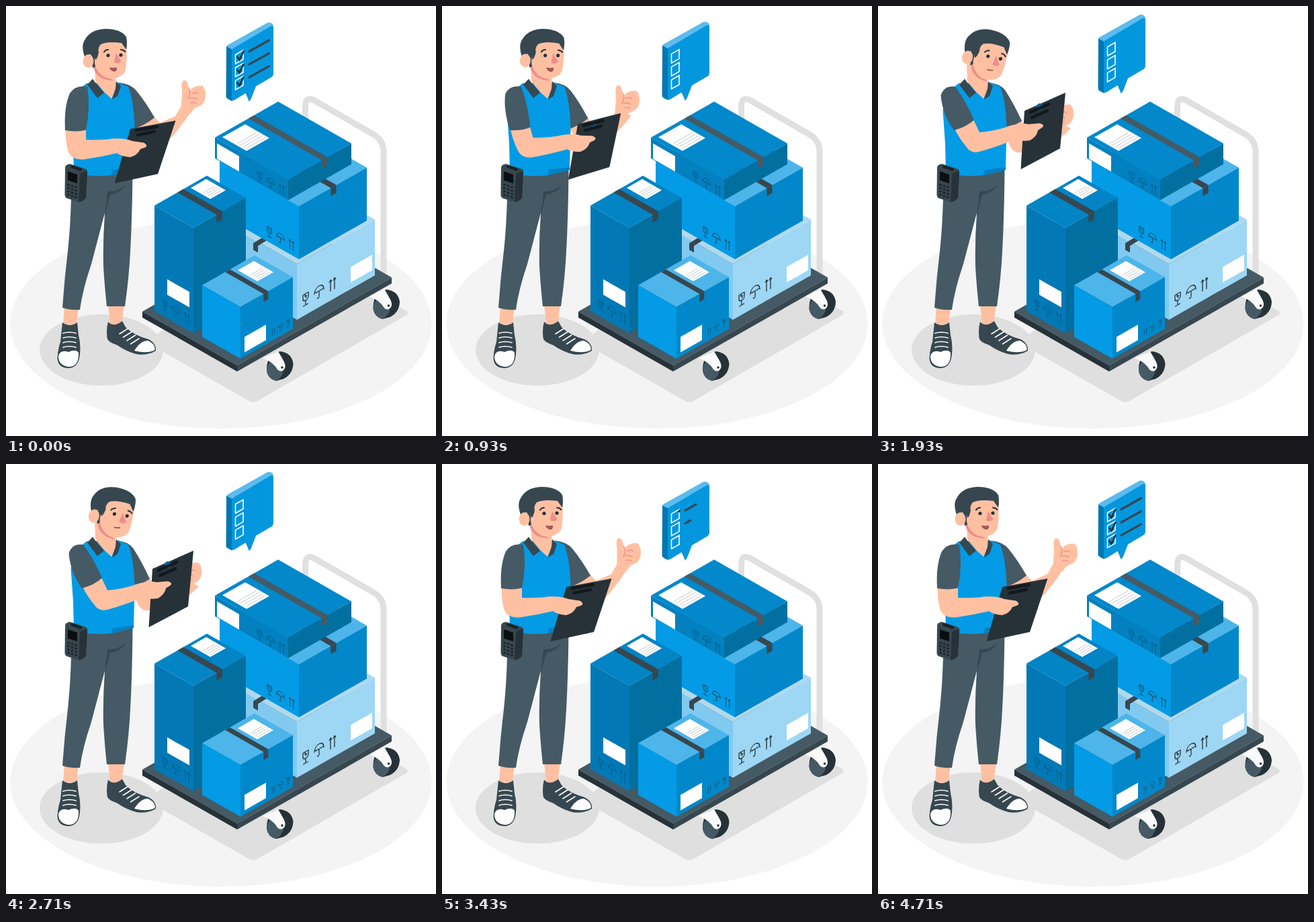
These frames come from a looping animation (640x640 px, 4780 ms). An HTML page:

```html
<!DOCTYPE html>
<html lang="en">
<head>
<meta charset="utf-8">
<title>Delivery check</title>
<style>
  html, body { margin: 0; width: 100%; height: 100%; overflow: hidden; background: #fff; }
  svg { display: block; width: 100vw; height: 100vh; }
</style>
</head>
<body>
<svg viewBox="0 0 640 640" xmlns="http://www.w3.org/2000/svg">
  <ellipse cx="320" cy="473" rx="313.5" ry="156" fill="#f4f4f4"/>
  <g fill="#dfdfdf">
    <ellipse cx="142" cy="512" rx="92" ry="53"/>
    <path d="M208 500L245 474L545 424L596 454Q600 457 596 460L374 588Q368 591 362 588Z"/>
  </g>
  <path d="M445.500 200V150Q445.500 133 459 140.500L545 190Q562 199 562 217V398" fill="none" stroke="#e0e0e0" stroke-width="9"/>

  <defs>
    <g id="wheel">
      <path d="M388 543Q387 527 398 517L408 514Q425 516 427.500 532Q427 548 413 555L402 558Q390 555 388 543Z" fill="#263238"/>
      <path d="M388 543Q388 530 399 527Q411 528 413 542Q412 552 402 558Q390 555 388 543Z" fill="#455a64"/>
      <path d="M382 524L405 514L412 526Q418 536 414 541Q409 546 404 541Q398 530 382 524Z" fill="#fafafa"/>
      <circle cx="411" cy="538" r="1.800" fill="#263238"/>
    </g>
  </defs>
  <use href="#wheel" x="158.500" y="-92"/>
  <use href="#wheel"/>
  <g id="cargo"></g>

  <g id="legs">
    <path d="M87 446H108L105 474H85Z M152 444H176L172 474H155Z" fill="#ffc0a2"/>
    <path d="M84 471Q95 479 106 471L108 490Q112 505 109.500 522Q107 539 92 539Q77 538 76.500 524Q77 512 81 500Z" fill="#37474f"/>
    <path d="M78 521Q81 511 93 515Q104 510 108 516Q109 537 93 537Q78 535 78 521Z" fill="#fff"/>
    <path d="M152 470Q160 479 173 469L178 478Q190 490 212 496Q224 502 223 513Q212 520 196 518.500Q180 515 166 505Q151 500 150.500 494Q149 480 152 470Z" fill="#37474f"/>
    <path d="M191 513Q200 498 211 498Q223 503 221.500 512Q210 518 191 513Z" fill="#fff"/>
    <g id="laces" fill="none" stroke="#fff" stroke-width="1.600" stroke-linecap="round"></g>
    <path d="M100 242L97 285Q96 325 92.500 360Q87 405 84 449Q96 453 110 452Q114 422 127 384L147 308Q144 350 145 388Q147 420 150 447H177Q183 405 185 365Q188 310 188.500 240Z" fill="#455a64"/>
    <path d="M147 312L151 276Q166 277 179 266Q170 279 155 281Z" fill="#37474f"/>
  </g>

  <path class="reach" fill="#ffc0a2"
    d="M188 180L220 164L229 174L252 164L260 150L276 156Q262 178 246 196Q235 207 220 200Q205 195 188 180Z"
    data-to="M190 178L213 168L218 178L250 172L266 172L287 182Q270 200 250 208Q228 219 207 218Q192 214 190 178Z"/>
  <g id="thumb">
    <path d="M260 154Q262 138 262 126Q260 113 264.500 110.500Q270 110 271 118L273 127Q278 118 292 118.500Q298 123 297 135Q296 147 285 150Q279 152 275 160Z" fill="#ffc0a2"/>
    <path d="M272 122Q276 130 271 138M277 130Q284 128 286 131M274 137Q281 136 284 139M275 144Q280 143 283 145" fill="none" stroke="#ef8d8b" stroke-width="1.400" stroke-linecap="round"/>
  </g>
  <path class="reach" fill="#455a64"
    d="M168 114Q186 116 194 126Q208 143 221 166Q206 178 190 183L178 130Z"
    data-to="M166 114Q182 116 189 125Q202 145 214 171Q204 178 190 182L178 130Z"/>
  <path d="M120 115L104 128L96.500 155L100 205L101 249Q130 255 158 252L190 244L191.500 180Q190 140 182 120L167 114Z" fill="#039be5"/>
  <path d="M157 252L159 244L190 240V244Z" fill="#0280c2"/>
  <path d="M132 84L133 112L146 128L157 138L164 122L163 98Z" fill="#ffc0a2"/>
  <path d="M129 108.500L121 117L136 137L146 129L133 114Z M164 112L171 119L166 134L158 139L163 123Z" fill="#37474f"/>

  <g id="head">
    <path d="M131 70L131 94Q136 110 160 111Q146 102 138 88Z" fill="#ef8d8b"/>
    <path d="M126 70L129 92Q132 93 136 84V66Z" fill="#37474f"/>
    <path d="M132 60V86Q136 102 151 107.500Q171 109 177.500 97Q181 80 179 56L165 46Z" fill="#ffc0a2"/>
    <path d="M118 78Q111 60 117 51Q125 35 148 34Q171 34 179 46Q181 55 179 65L172 55Q152 52 141 57Q136 63 138 69Q136 79 133 80Q131 71 126 72Q121 73 118 78Z" fill="#37474f"/>
    <ellipse cx="122.500" cy="82" rx="8" ry="10" fill="#ffc0a2"/>
    <path d="M163.500 70L171.500 82Q168 87 161 84Z" fill="#ef8d8b"/>
    <g fill="#263238"><circle cx="152" cy="73.500" r="2.600"/><circle cx="171" cy="73" r="2.600"/></g>
    <path d="M146 68.500Q148 65 152 65M171 65Q175 65 177.500 68" fill="none" stroke="#263238" stroke-width="2" stroke-linecap="round"/>
    <path id="mouth" fill="#b25553" stroke="#7d4045" stroke-width=".8"
      d="M154.500 92Q159 93 164.500 92Q165 98 160 97Q156 96 154.500 92Z"
      data-to="M155 93Q159 93 164 92Q164 92.500 160 93.300Q156 93.800 155 93Z"/>
  </g>

  <g id="pager">
    <path d="M88 241Q88 236 95 235L117 242Q122 244 121 248L119 285Q117 290 109 292L90 286Q87 284 87.500 280Z" fill="#37474f"/>
    <path d="M110 251Q111 247 121 246L119 285Q117 290 108 292Z" fill="#263238"/>
    <path d="M92 246L106 251V264L92 259.500Z" fill="#0b0f11"/>
    <path d="M98 239L111 243.500" stroke="#1a2327" stroke-width="4" stroke-linecap="round"/>
  </g>

  <path class="reach" fill="#263238"
    d="M185 183L252.500 170.500L226 250L161.500 264Z"
    data-to="M218 156L279 129L271 212L212.500 243Z"/>
  <circle id="ring" r="5" fill="#02659b"/>
  <path class="reach" fill="none" stroke="#12191d" stroke-width="4.500" stroke-linecap="round"
    d="M194 185L225 179.500M196 192L221 187"
    data-to="M227 158L254 146M229 166L252 156"/>
  <path class="reach" fill="#ffc0a2"
    d="M89 183L119 184L119 199Q140 200 162 197.500L165 219Q140 225 115 228.500Q96 229 92 215Q88 200 89 183Z"
    data-to="M114 183L142 169L151 188Q170 187 195 179L203 199Q173 211 150 217Q138 220 131 209Q121 197 114 183Z"/>
  <path id="hand" d="M-4 -10.500Q18 -12 28 -7L45 -4.500Q53 0 46 3L40 5Q36 14 25 17Q12 16 5 11L-4 11Z" fill="#ffc0a2"/>
  <path class="reach" fill="#455a64"
    d="M121 120Q103 117 95 130Q86 150 88 185Q105 188 119 184.500Q126 150 121 120Z"
    data-to="M115 120Q98 118 93.500 133Q96 162 113 185Q132 180 143 169.500Q130 140 115 120Z"/>

  <g id="bubble">
    <path d="M328 62Q328 59 331 57.500L389 25Q393 23.500 397 27L398 31L337 66Z" fill="#5bbcee"/>
    <path d="M328 60L337 65V141.500Q332 140 328.500 137Q327.500 136 327.500 134Z M356 128L365 122L362 142Z" fill="#0277b3"/>
    <path d="M336 68Q336 64 339 62.500L394 30Q398 28 398 32V101Q398 104 395 106L372 119.500L364.500 139L361.500 142L358 129L340 140Q336 142 336 138Z" fill="#0497de"/>
    <g id="rows" fill="none"></g>
  </g>
</svg>

<script>
const LOOP = 4780, SLOPE = .57;
const INK = '#263238', TAPE = '#37474f';
const $ = id => document.getElementById(id);

// ---- cargo, in an isometric view ----
const poly = (fill, ...pts) => `<polygon points="${pts}" fill="${fill}"/>`;

// A box seen from its front top corner (x, y); a runs left, b runs right.
function box(x, y, a, b, h, [top, left, right]) {
  // p goes along the left edge towards the viewer, q away from it, drop straight down
  const at = (p, q, drop = 0) => [x - a + p + q, y + (p - a - q) * SLOPE + drop];
  const quad = (fill, p, q, w, d) => poly(fill, at(p, q), at(p, q + d), at(p + w, q + d), at(p + w, q));
  return {
    body: quad(top, 0, 0, a, b) +
      poly(left, at(0, 0), at(a, 0), at(a, 0, h), at(0, 0, h)) +
      poly(right, at(a, 0), at(a, b), at(a, b, h), at(a, 0, h)),
    tape: (from, to, fill = TAPE) => quad(fill, 0, from * b, a, (to - from) * b) +
      poly(fill, at(a, from * b), at(a, to * b), at(a, to * b, 12), at(a, from * b, 12)),
    label(p, q, w, d) {
      let print = '';
      for (let f = .54; f < .95; f += .12) print += `M${at(p + w * f, q + 3)}L${at(p + w * f, q + d - 3)}`;
      return quad('#fff', p, q, w, d) + `<path d="${print}" stroke="#c3cbcf"/>`;
    },
    sticker(p, q, drop) {
      const end = q ? [p, q + 32] : [p + 33, 0];
      return poly('#fff', at(p, q, drop), at(...end, drop), at(...end, drop + 23), at(p, q, drop + 23));
    }
  };
}

const ICONS = [
  'M-4 -9H4V-3Q4 1 0 1Q-4 1 -4 -3ZM0 1V8M-4 8H4M0 -9L-1.500 -6L1.500 -5L0 -2',
  'M-7 -1Q-6 -9 0 -9Q6 -9 7 -1Q5 -3 3.500 -1Q2 -3 0 -1Q-2 -3 -3.500 -1Q-5 -3 -7 -1ZM0 -1V7Q-1 10 -3 7',
  'M-3 9V-8M-5 -5L-3 -8L-1 -5M3 9V-8M1 -5L3 -8L5 -5'
];
function icons(x, y, step, slope, color) {
  const size = Math.abs(step) / 20;
  return ICONS.map((d, i) => `<path d="${d}" fill="none" stroke="${color}" stroke-width="1.300"
    transform="matrix(${size} ${size * slope} 0 ${size} ${x + i * step} ${y + i * step * slope})"/>`).join('');
}

const deck = box(344, 535, 141, 230, 9, ['#455a64', '#263238', '#37474f']);
const pale = box(433, 384, 123, 116, 83, ['#b0d9ec', '#82c9f0', '#9dd7f4']);
const wide = box(436, 298, 118, 101, 79, ['#4db5ea', '#039be5', '#0288ca']);
const flat = box(420, 258, 109, 94, 31, ['#0288cb', '#0280bf', '#026fa1']);
const tall = box(279, 330, 58, 78, 157, ['#0284c5', '#0279b6', '#026fa1']);
const cube = box(349, 448, 57, 78, 77, ['#4db5ea', '#039be5', '#0288ca']);

$('cargo').innerHTML =
  deck.body +
  pale.body + pale.sticker(123, 80, 50) + icons(446, 437, 20, -SLOPE, INK) +
  poly(TAPE, 368, 353, 381, 345, 388, 349, 375, 357, 375, 367, 368, 363) +
  wide.body + wide.tape(.47, .55) + icons(392, 337, 16.5, SLOPE, '#26516a') +
  flat.body + flat.tape(.53, .62, '#455a64') + flat.label(5, 6, 36, 34) + flat.sticker(3, 0, 7) +
  icons(377.5, 255, 16.5, SLOPE, '#02608f') +
  tall.body + tall.tape(.44, .55) + tall.label(4, 50, 29, 23) + tall.sticker(19, 0, 99) +
  icons(236.5, 446, 16.5, SLOPE, '#02608f') +
  cube.body + cube.tape(.44, .53) + cube.label(7, 46, 29, 24) + cube.sticker(57, 6, 48) +
  icons(420, 472, -11, -SLOPE, '#125a80');

// ---- small repeats ----
let keys = '', laces = '', rows = '';
for (let i = 0; i < 12; i++) {
  const c = i % 3, r = (i - c) / 3;
  keys += `<ellipse cx="${93 + c * 5.5}" cy="${266 + r * 5 + c * 1.8}" rx="1.900" ry="1.600" fill="#1a2327"/>`;
}
for (let i = 0; i < 4; i++) {
  const y = 487 + i * 7, x = 169 + i * 5.5;
  laces += `M85 ${y}Q94 ${y - 3} 104 ${y}M${x} ${488 + i * 5}l12.500 -8`;
}
for (let i = 0; i < 3; i++) rows += `<g transform="translate(0 ${i * 19.3})">
  <path d="M341.500 72.500L353 66V79.500L341.500 86Z" stroke="#fff" stroke-width="1.600"/>
  <path class="ink" pathLength="1" d="M354 66.500L347.500 80L343.500 75" stroke="${INK}" stroke-width="2.600"/>
  <path class="ink" pathLength="1" d="M362 67.500L391.500 51" stroke="${TAPE}" stroke-width="3.200" stroke-linecap="round"/></g>`;
$('pager').innerHTML += keys;
$('laces').innerHTML = `<path d="${laces}"/>`;
$('rows').innerHTML = rows;

// ---- motion ----
const span = (t, from, to) => Math.max(0, Math.min(1, (t - from) / (to - from)));
const smooth = (t, from, to) => { const u = span(t, from, to); return u * u * (3 - 2 * u); };
const easeOut = (t, from, to, power) => 1 - (1 - span(t, from, to)) ** power;

// Blends a path towards its data-to shape, with separate amounts for x and y.
const NUMBER = /[\d.]+/g;
function morpher(el) {
  const shape = el.getAttribute('d'), goal = el.dataset.to.match(NUMBER);
  return (ax, ay) => {
    let n = 0;
    el.setAttribute('d', shape.replace(NUMBER, v => {
      const amount = n % 2 ? ay : ax;
      return (+v + (goal[n++] - v) * amount).toFixed(2);
    }));
  };
}
const reachers = [...document.querySelectorAll('.reach')].map(morpher);
const setMouth = morpher($('mouth'));
const inks = [...document.querySelectorAll('.ink')];

function move(id, x, y, turn = 0, cx = 0, cy = 0) {
  $(id).setAttribute('transform', `translate(${x} ${y}) rotate(${turn} ${cx} ${cy})`);
}

function draw(t) {
  // Reaching across and lifting: the rise lags behind, so limbs follow an arc.
  const reach = easeOut(t, 640, 1990, 3) - easeOut(t, 2750, 3400, 2);
  const rise = reach * reach;
  const tilt = 13 * (smooth(t, 640, 1900) - smooth(t, 2450, 3350));
  const frown = smooth(t, 1450, 1900) - smooth(t, 3000, 3350);
  const over = smooth(t, 2900, 3400) - easeOut(t, 3430, 4710, 2);
  const lift = 12.7 * (smooth(t, 640, 2200) - smooth(t, 2750, 3400));

  reachers.forEach(set => set(reach, rise));
  setMouth(frown, frown);
  move('head', tilt * .2, tilt * -.1, tilt, 145, 115);
  move('hand', 160 + 38 * reach, 208 - 19 * rise, -13 * reach);
  move('thumb', -6 * reach, 28 * rise, -2.4 * over, 266, 160);
  move('ring', 209 + 32 * reach, 185 - 35 * rise);
  $('ring').setAttribute('opacity', reach);
  move('bubble', 0, 1.6 * over - lift);

  inks.forEach((ink, i) => {
    const row = i >> 1, start = 3290 + row * 72 + (i % 2 ? 0 : 90), gone = (2 - row) * 80;
    const shown = t < 2000 ? 1 - span(t, gone, gone + 420) : span(t, start, start + 260);
    ink.style.strokeDasharray = `${shown} 2`;
    ink.style.visibility = shown > 0 ? 'visible' : 'hidden';
  });
}

function tick() {
  draw(performance.now() % LOOP);
  requestAnimationFrame(tick);
}
tick();
</script>
</body>
</html>
```
